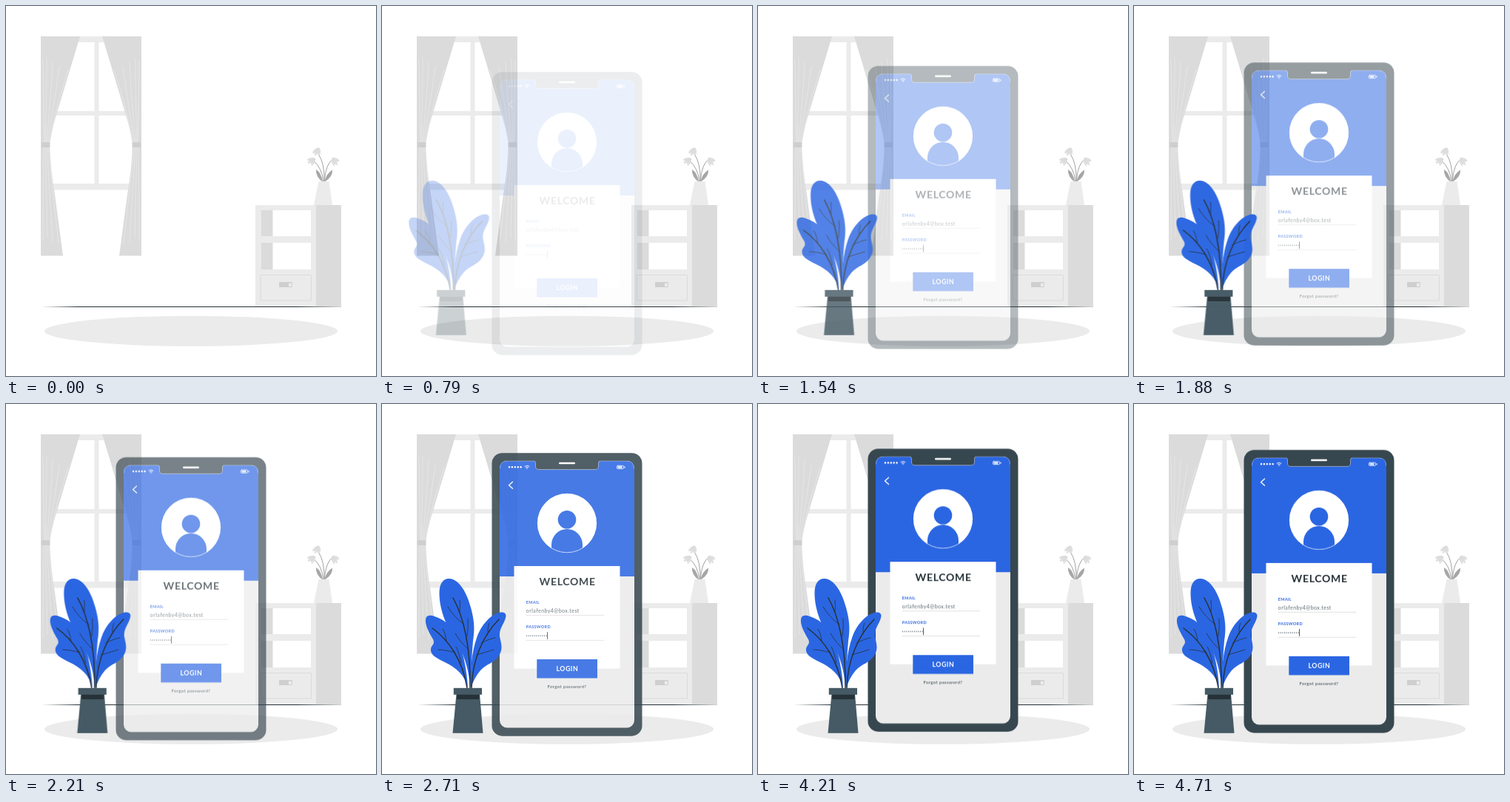
Write an HTML page that moves like this. It is 500 px wide and 500 px high and loops after 4.75 s.

```html
<!DOCTYPE html>
<html lang="en">
<head>
<meta charset="utf-8">
<title>Login screen</title>
<style>
  html, body { margin: 0; width: 100%; height: 100%; overflow: hidden; background: #fff; }
  svg { display: block; width: 100%; height: 100%; font-family: Lato, Inter, sans-serif; }
  .line { fill: none; stroke-linecap: round; stroke-linejoin: round; }
  .pale { fill: #ebebeb; }
  .gray { fill: #dbdbdb; }
  .white { fill: #fff; }
  .blue { fill: #2b66e2; }
  .slate { fill: #37474f; }
  .ink { fill: #263238; }
  .vein { stroke: #263238; stroke-width: .8; }
  .bold { font-weight: 700; }
</style>
</head>
<body>
<svg viewBox="0 0 500 500">
  <defs>
    <linearGradient id="taper">
      <stop offset="0" stop-color="#263238" stop-opacity="0"/>
      <stop offset=".12" stop-color="#263238"/>
      <stop offset=".85" stop-color="#263238"/>
      <stop offset="1" stop-color="#263238" stop-opacity=".2"/>
    </linearGradient>
    <clipPath id="disc"><circle cx="250" cy="157" r="40"/></clipPath>
    <g id="curtain">
      <path class="gray" d="M47 41H100L66 154Q61 172 59 187Q60 220 66 255L77 337.500H47Z"/>
      <g class="line" stroke="#e9e9e9" stroke-width=".8">
        <path d="M50 73Q51 140 52 184M55 70Q55 140 53 184M63 75Q60 140 54.500 184M72 82Q64 140 56 184M84 86Q68 135 57.500 184"/>
        <path d="M51 191Q50 250 50 316M53 191Q55 250 56 312M55 191Q59 250 63 318M57 191Q63 250 71 320"/>
      </g>
      <rect x="48" y="184" width="11.500" height="7" rx="1" fill="#cfcfcf"/>
    </g>
    <g id="bloom">
      <path fill="#e0e0e0" d="M0 -5Q5 -3 5 4Q3 6 1 3Q0 7 -2 7Q-3 5 -2.500 3Q-5 6 -6 4Q-5 -3 0 -5Z"/>
      <path class="line" stroke="#cfcfcf" stroke-width=".5" d="M0 -4Q2 0 1 3M0 -4Q-3 0 -2.500 3"/>
    </g>
  </defs>

  <g id="room">
    <path class="pale" d="M70 41H160V49H70ZM119.500 45H125.500V244H119.500ZM62 142H170V148H62ZM60 240H170V248.500H60Z"/>
    <use href="#curtain"/>
    <use href="#curtain" transform="translate(230) scale(-1 1)"/>

    <path class="pale" d="M337 269H419V406H337Z"/>
    <path class="gray" d="M419 269H453V406H419Z"/>
    <path class="white" d="M344.500 276H412V311H344.500ZM344.500 320H412V356H344.500Z"/>
    <path class="gray" d="M344.500 276H360.500V311H344.500ZM344.500 320H360.500V356H344.500Z"/>
    <rect class="line" x="344.500" y="363.500" width="68" height="34.500" stroke="#dbdbdb"/>
    <rect x="369" y="373" width="18" height="7" rx="1" fill="#cfcfcf"/>
    <rect x="382" y="374.500" width="4" height="4.500" class="pale"/>

    <g class="line" stroke="#a0a0a0" stroke-width="1">
      <path d="M430 238Q431 212 422 200M429 238Q427 218 416 210M430 238Q432 212 442 207"/>
    </g>
    <path fill="#a6a6a6" d="M428 238Q426 225 419 221Q418 230 428 238ZM430 238Q433 226 441 221.500Q442 231 430 238Z"/>
    <use href="#bloom" transform="translate(421 196) rotate(20)"/>
    <use href="#bloom" transform="translate(414 209) rotate(50)"/>
    <use href="#bloom" transform="translate(444 209) rotate(-45)"/>
    <path class="pale" d="M422.500 237H436.500L441 269H416Z"/>

    <ellipse class="pale" cx="250" cy="439.300" rx="198" ry="20.500"/>
    <rect x="48" y="406" width="405" height="1" fill="url(#taper)"/>
  </g>

  <g id="reveal">
    <g id="phone">
      <rect class="slate" x="148.500" y="62.200" width="203" height="382.500" rx="14"/>
      <rect class="pale" x="159" y="73" width="182" height="360.500" rx="10"/>
      <path class="blue" d="M159 229V83Q159 73 169 73H205Q207.500 73 207.500 76V80Q207.500 84.500 212 84.500H288Q292.500 84.500 292.500 80V76Q292.500 73 295 73H331Q341 73 341 83V229Z"/>
      <path class="slate" d="M205 72.500Q207.500 73 207.500 76V80Q207.500 84.500 212 84.500H288Q292.500 84.500 292.500 80V76Q292.500 73 295 72.500Z"/>
      <path class="line" stroke="#fff" stroke-opacity=".6" stroke-width=".5" d="M159.500 83Q159.500 73 169 73H205Q207.500 73 207.500 76V80Q207.500 84.500 212 84.500H288Q292.500 84.500 292.500 80V76Q292.500 73 295 73H331Q340.500 73 340.500 83"/>
      <rect class="white" x="239" y="74.800" width="22" height="2.400" rx="1.200"/>

      <g class="line" stroke="#fff">
        <path stroke-width="2.600" stroke-dasharray="0 3.900" d="M172 81.300H188"/>
        <path stroke-width=".9" d="M193 80.300Q196 77.800 199 80.300M194.500 81.800Q196 80.500 197.500 81.800"/>
        <path stroke-width="1.200" d="M196 83.200V83.300"/>
        <rect x="317.500" y="79.300" width="9" height="4.200" rx="1" stroke-width=".8"/>
        <path stroke-width="1.200" d="M328 80.900V82"/>
        <path stroke-width="1.400" d="M176.500 101.300L171.500 105.800L176.500 110.300"/>
      </g>
      <rect class="white" x="318.500" y="80.300" width="6" height="2.200"/>

      <circle class="white" cx="250" cy="157" r="40"/>
      <g class="blue" clip-path="url(#disc)">
        <circle cx="250" cy="152.200" r="12.300"/>
        <path d="M229 198V186A21 21 0 0 1 271 186V198Z"/>
      </g>
      <circle class="line" cx="250" cy="157" r="39.700" stroke="#fff" stroke-width=".6"/>

      <rect class="white" x="178.500" y="215" width="143" height="138.500"/>
      <text class="ink bold" x="212.500" y="240.800" font-size="14" letter-spacing=".7">WELCOME</text>
      <g class="blue bold" font-size="5.500" letter-spacing=".28">
        <text x="194.800" y="265.600">EMAIL</text>
        <text x="194.800" y="299.200">PASSWORD</text>
      </g>
      <text x="194.800" y="278.300" font-size="7" letter-spacing=".45" fill="#5f6b70">orlafenby4@box.test</text>
      <path class="line" stroke="#c4c4c4" stroke-width=".5" d="M195 281.500H300M195 315.400H300"/>
      <path class="line" stroke="#37474f" stroke-width="1.300" stroke-dasharray="0 2.640" d="M195.700 309.200H222.200"/>
      <path class="line" stroke="#263238" stroke-width=".8" d="M223.500 304.500V313.500"/>
      <rect class="blue" x="209.300" y="341" width="81.700" height="25.500"/>
      <text class="white bold" x="235.500" y="357.200" font-size="8.800" letter-spacing=".5">LOGIN</text>
      <text x="223.500" y="380.200" font-size="6.200" letter-spacing=".3" fill="#37474f">Forgot password?</text>
    </g>

    <g id="plant">
      <g class="blue">
        <path d="M118 384C117 352 104 328 98 318C88 303 76 280 76.500 254C77 242 82 235.500 90 236C103 237 113 253 119 275C123 290 125 302 122 320C120 340 120 362 118 384Z"/>
        <path d="M115 384C111 366 99 356 84 349C72 343 64 339 65 331C66 325 71 325 68 318C62 308 56 297 58.500 289C60 285 65 285 70 287C84 292 97 301 103 320C109 339 114 360 115 384Z"/>
        <path d="M119 384C118 360 120 336 127 316C133 298 146 285 157 282C164 280.500 168 283 166 289C164 297 157 304 158 314C160 324 163 331 157 340C151 350 140 351 132 360C126 367 122 375 119 384Z"/>
      </g>
      <g class="line vein">
        <path stroke-width="1.500" d="M95 262C108 285 119 325 118 384"/>
        <path stroke-width="1.500" d="M67 303C88 318 108 345 114 384"/>
        <path stroke-width="1.500" d="M157 291C136 312 121 345 120 384"/>
        <path d="M104 281Q105 272 104 265M110 298Q96 288 88 274M114 314Q116 301 115 290M116 332Q104 321 98 310"/>
        <path d="M86 320Q85 310 81 304M98 336Q84 332 75 332M106 350Q103 335 99 328"/>
        <path d="M142 308Q142 300 144 296M133 323Q145 317 152 316M127 339Q140 335 150 332"/>
      </g>
      <g fill="#455a64">
        <path d="M99.500 392H131L135.500 444.700H94.500Z"/>
        <path class="ink" d="M100 392H131L130.300 399H100.500Z"/>
        <rect x="95.800" y="383.800" width="38.200" height="9"/>
      </g>
    </g>
  </g>
</svg>
<script>
  const LOOP = 4750;
  const START = 330;
  const BACK = "cubic-bezier(.36, -.01, .5, 1.38)";

  const play = (id, frames) =>
    document.getElementById(id).animate(frames, { duration: LOOP, iterations: Infinity }).startTime = 0;

  // Fade and slide to rest with a slight overshoot, then hold.
  const slideIn = (id, from, end) => {
    const rest = { opacity: 1, transform: "translate(0px, 0px)" };
    const frames = [{ opacity: 0, transform: `translate(${from})`, easing: BACK, offset: 0 }, { ...rest, offset: end }];
    if (end < 1) frames.push({ ...rest, offset: 1 });
    play(id, frames);
  };

  slideIn("phone", "0px, 30px", 1);
  slideIn("plant", "-30px, 0px", 0.6);
  play("reveal", [
    { opacity: 0, offset: 0 },
    { opacity: 0, offset: START / LOOP },
    { opacity: 1, offset: START / LOOP },
    { opacity: 1, offset: 1 }
  ]);
</script>
</body>
</html>
```
